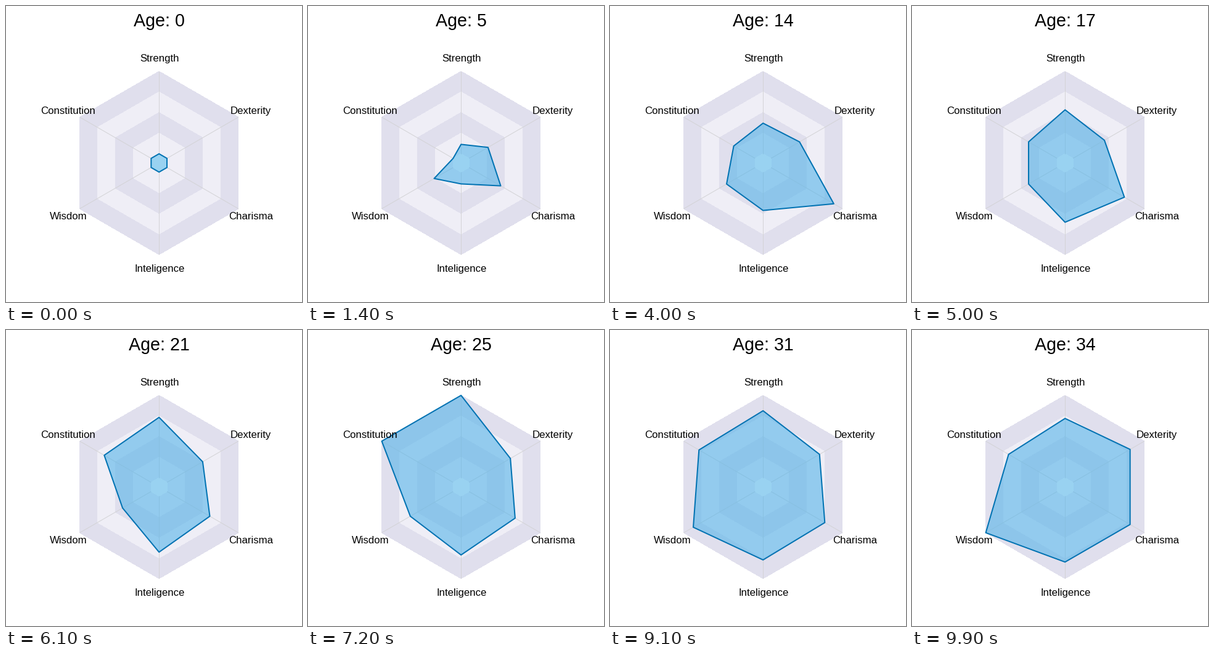
Animation, 480 px wide and 480 px high, one loop 10000 ms. Source, as a matplotlib script:

```python
import numpy as np
import matplotlib.pyplot as plt
from matplotlib.animation import FuncAnimation
from matplotlib.patches import Polygon

SIZE, DPI = 480, 72          # at 72 dpi one point is one pixel
FRAMES, INTERVAL = 100, 100
LAST_AGE = 34
CENTER = np.array([248.2, 254.5])
RADIUS = 148.5
LABEL_RADIUS = 1.15
RINGS = 4

DARK, LIGHT = "#e0dfed", "#efeef6"
FILL, EDGE = (86 / 255, 180 / 255, 233 / 255, 0.6), "#0072b2"

# Stages of life as (last age, score out of 5), clockwise from the top.
STAGES = {
    "Strength": [(14, 2), (24, 5), (34, 3.6)],
    "Dexterity": [(6, 2), (14, 2), (25, 3), (28, 3), (34, 4)],
    "Charisma": [(9, 5), (20, 3), (34, 4)],
    "Inteligence": [(19, 3.4), (34, 4)],
    "Wisdom": [(6, 2), (19, 2), (24, 3), (34, 5)],
    "Constitution": [(3, 0), (16, 2), (24, 5), (34, 3.4)],
}

angles = np.arange(6) * np.pi / 3
DIRECTIONS = np.column_stack([np.sin(angles), -np.cos(angles)])


def scale(fraction):
    """Radial position of 0..1; zero sits a little off the centre."""
    return 0.1 + 0.9 * fraction


def hexagon(values):
    """Corner points for one value per axis, or one value for all."""
    return CENTER + RADIUS * DIRECTIONS * np.reshape(values, (-1, 1))


def score_at(age, stages):
    """Linear within a stage; a new stage starts from the last score."""
    first, score = 0, 0
    for last, goal in stages:
        if age <= last:
            return score + (goal - score) * (age - first) / (last - first)
        first, score = last + 1, goal
    return score


def abilities_at(age):
    return [scale(score_at(age, stages) / 5) for stages in STAGES.values()]


def add_text(x, y, text, size):
    return ax.text(x, y, text, fontsize=size, family="Liberation Sans",
                   color="black", ha="center", va="baseline", zorder=4)


fig = plt.figure(figsize=(SIZE / DPI, SIZE / DPI), dpi=DPI, facecolor="white")
ax = fig.add_axes([0, 0, 1, 1])
ax.set(xlim=(0, SIZE), ylim=(SIZE, 0))
ax.axis("off")

for ring in range(RINGS, -1, -1):
    color = "white" if ring == 0 else LIGHT if ring % 2 else DARK
    ax.add_patch(Polygon(hexagon(scale(ring / RINGS)), facecolor=color,
                         edgecolor="none", antialiased=False, zorder=1))

for inner, outer in zip(hexagon(scale(0)), hexagon(scale(1))):
    ax.plot(*zip(inner, outer), color="#d3d3d6", lw=1, zorder=2,
            solid_capstyle="butt")

shape = ax.add_patch(Polygon(hexagon(scale(0)), facecolor=FILL, edgecolor=EDGE,
                             lw=2, joinstyle="round", zorder=3))

for name, (x, y) in zip(STAGES, hexagon(LABEL_RADIUS)):
    add_text(x + 0.6, y + 6.2, name, 16.8)
title = add_text(248.5, 33, "Age: 0", 28.6)


def update(frame):
    time = frame * LAST_AGE / (FRAMES - 1)
    # The title rounds to the nearest year; the shape waits for the full year.
    title.set_text(f"Age: {round(time)}")
    shape.set_xy(hexagon(abilities_at(int(time + 0.015))))
    return title, shape


anim = FuncAnimation(fig, update, frames=FRAMES, interval=INTERVAL,
                     repeat=True, repeat_delay=0)
plt.show()
```
